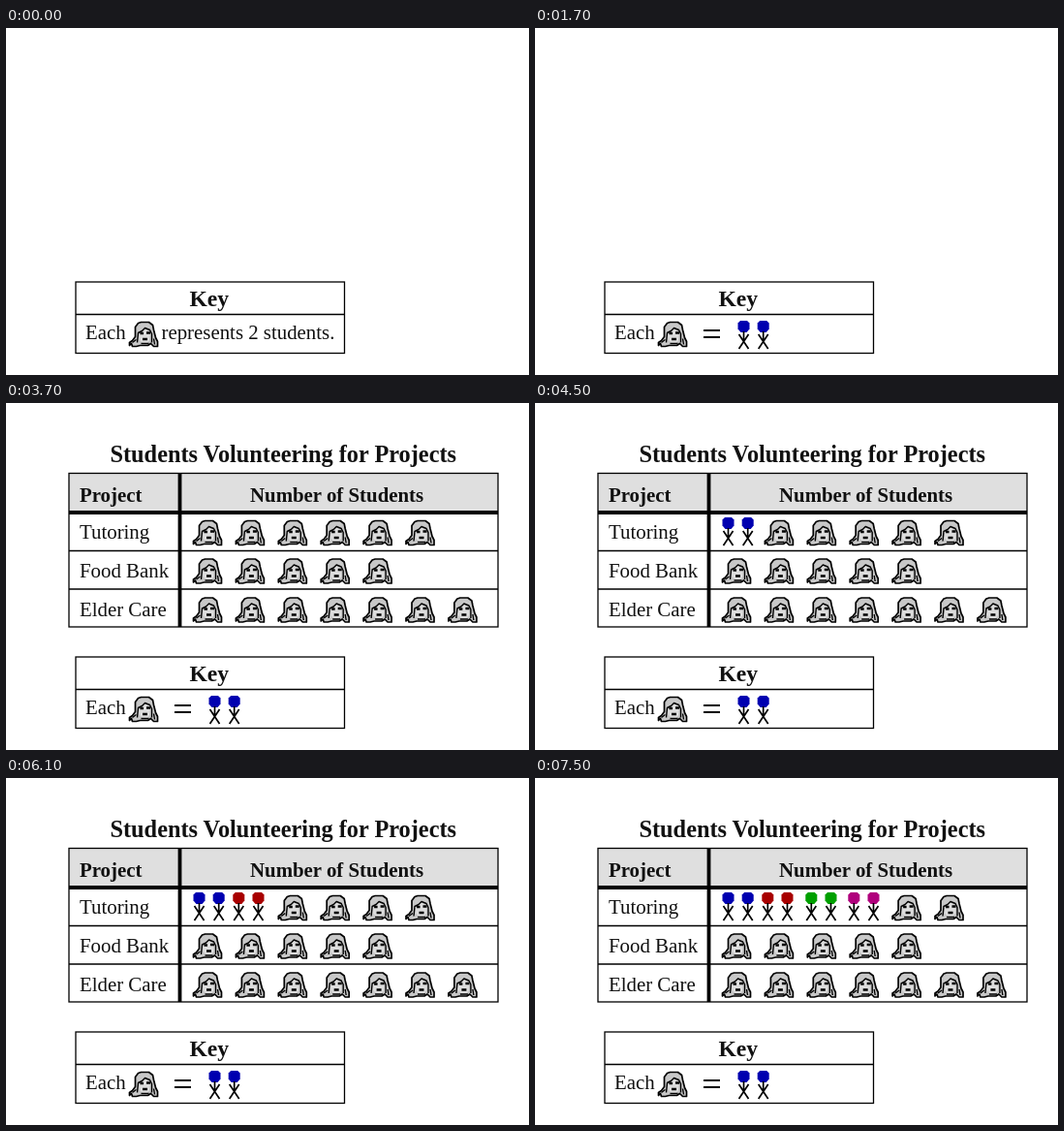
These frames come from a looping animation (540 px wide and 358 px high, 8 s). An HTML page:

```html
<!DOCTYPE html>
<html lang="en">
<head>
<meta charset="utf-8">
<title>Pictograph</title>
<style>
  html, body { margin: 0; width: 100%; height: 100%; overflow: hidden; background: #fff; }
  svg { display: block; width: 540px; height: 358px; }
  text { font: 20.85px "Liberation Serif", "Times New Roman", serif; fill: #111; }
  .bold { font-weight: bold; }
  .title { font-size: 24.3px; }
  .key { font-size: 23.6px; }
  .line { fill: none; stroke: #000; stroke-width: 1.3; }
</style>
</head>
<body>
<svg viewBox="0 0 540 358">
  <defs>
    <g id="girl" stroke-linejoin="round">
      <path d="M1 25 V22 L4 20 L7 16 V6 L10 2 L13 1 H21 L25 4 L26 9 L28 17 L30 21 V26 H26 L23 23 L20 25 H12 L8 26 H4 L3 23 Z"
        fill="#c8c8c8" stroke="#000" stroke-width="1.7"/>
      <path d="M11 13 L14 11 L17 8 L22 11 V19 L19 23 H15 L11 19 Z" fill="#ddd"/>
      <path d="M9 22 L10 12 L14 10 L17 7 L22 9 L24 13 V22 M4 22 L8 19 M26 18 L27 24" fill="none" stroke="#000" stroke-width="1.4"/>
      <path d="M12 12.5 H15.5 M18.5 12 H22.5 M14.5 18.5 H19.5" fill="none" stroke="#000" stroke-width="2.6"/>
      <path d="M13 23 H21" stroke="#000" stroke-width="1.5"/>
    </g>
    <g id="person">
      <path d="M-3.5 0 H3.5 L6 2.5 V8.5 L3 12 H-3 L-6 8.5 V2.5 Z"/>
      <path d="M0 11 V21 M-5 14 L5 29 M5 14 L-5 29" fill="none" stroke="#000" stroke-width="1.7"/>
    </g>
  </defs>

  <g class="line">
    <rect x="72" y="262" width="277.5" height="73.5"/>
    <path d="M72 295.5 H349.5"/>
  </g>
  <text class="bold key" x="189.5" y="286.5">Key</text>
  <text x="82" y="321">Each</text>
  <use href="#girl" x="126.5" y="302.5"/>
  <text x="160.5" y="321" data-to="500">represents 2 students.</text>
  <g id="equation" data-from="500">
    <path d="M174 312 H191 M174 319 H191" stroke="#000" stroke-width="2"/>
  </g>

  <g id="chart" data-from="2500">
    <text class="bold title" x="107.5" y="60.5">Students Volunteering for Projects</text>
    <rect x="65" y="72" width="443" height="41" fill="#dfdfdf"/>
    <g class="line">
      <rect x="65" y="72.5" width="443" height="158.5"/>
      <path d="M65 152.5 H508 M65 192 H508"/>
      <path d="M65 113 H508 M179.5 72 V231" stroke-width="3.8"/>
    </g>
    <text class="bold" x="76" y="101.5">Project</text>
    <text class="bold" x="252" y="101.5">Number of Students</text>
  </g>
</svg>
<script>
const LOOP = 8000;
const COLORS = ["#0000b0", "#a80000", "#00a000", "#b0007c"];
const PAIR_X = [199.5, 240.3, 285.3, 329.3];
const ROWS = [["Tutoring", 6, 140], ["Food Bank", 5, 179.5], ["Elder Care", 7, 219.5]];
const chart = document.getElementById("chart");

function add(parent, tag, attrs, text = "") {
  const el = document.createElementNS("http://www.w3.org/2000/svg", tag);
  for (const key in attrs) el.setAttribute(key, attrs[key]);
  el.textContent = text;
  parent.append(el);
  return el;
}

function addPair(parent, x, y, color, from) {
  const pair = add(parent, "g", { fill: color, "data-from": from });
  for (const dx of [0, 20.2]) add(pair, "use", { href: "#person", x: x + dx, y });
}

addPair(document.getElementById("equation"), 215.5, 302, COLORS[0], 500);

ROWS.forEach(([name, count, base], row) => {
  add(chart, "text", { x: 76, y: base }, name);
  for (let i = 0; i < count; i++) {
    const girl = add(chart, "use", { href: "#girl", x: 192.5 + 43.9 * i, y: base - 19.5 });
    if (row === 0 && i < COLORS.length) {
      const swap = 4500 + 1000 * i;
      girl.dataset.to = swap;
      addPair(chart, PAIR_X[i], 118, COLORS[i], swap);
    }
  }
});

const timed = [...document.querySelectorAll("[data-from], [data-to]")];
const start = performance.now();

function draw() {
  const t = Math.max(0, performance.now() - start) % LOOP;
  for (const el of timed) {
    const { from = 0, to = LOOP } = el.dataset;
    el.style.display = t >= from && t < to ? "" : "none";
  }
  requestAnimationFrame(draw);
}
draw();
</script>
</body>
</html>
```
